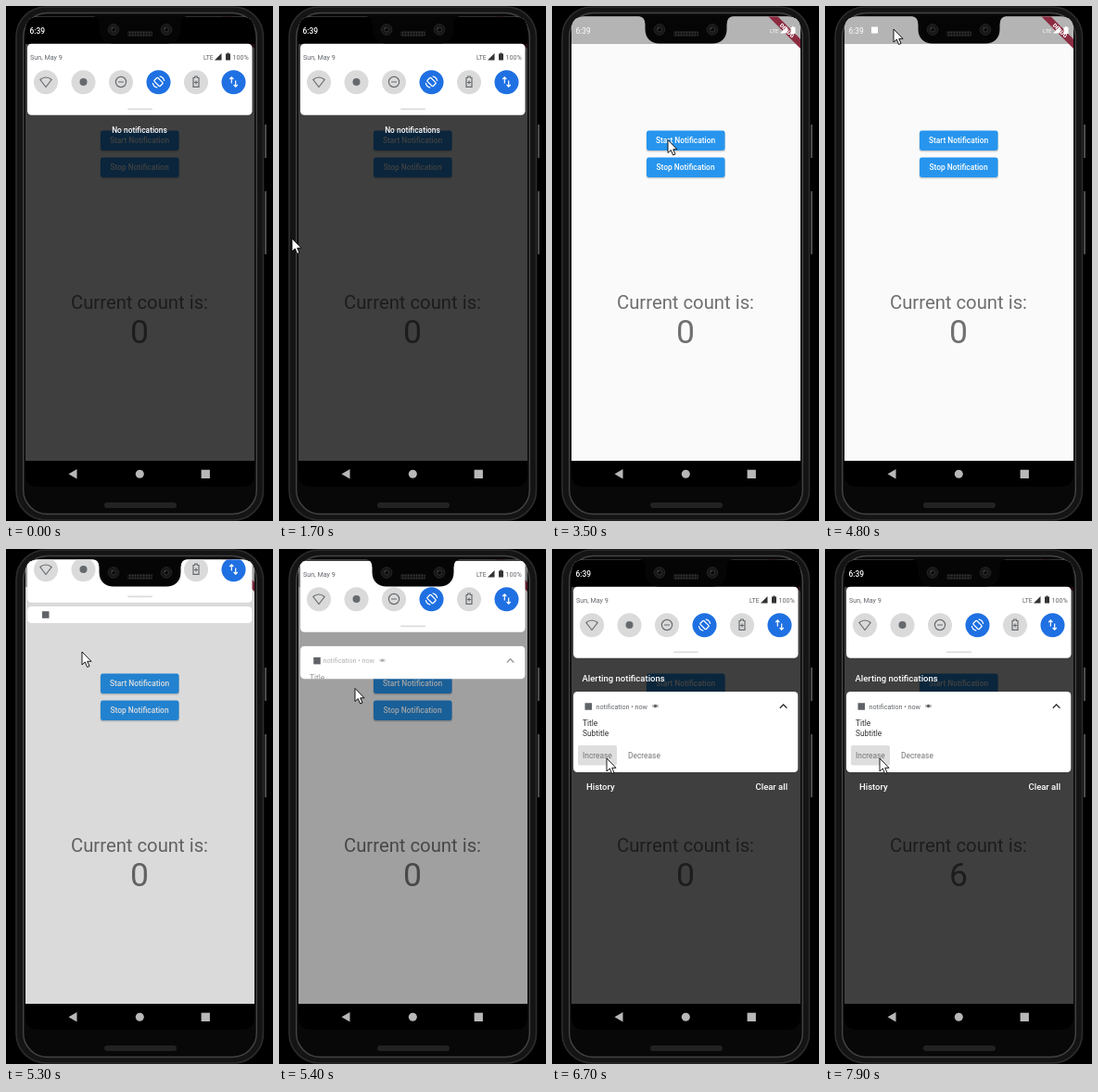
An HTML page that plays this animation: 288x556 px, repeating every 8 s.

```html
<!DOCTYPE html>
<html lang="en">
<head>
<meta charset="utf-8">
<title>Notification counter</title>
<style>
html, body { margin: 0; width: 100%; height: 100%; overflow: hidden; background: #000; }
svg { display: block; width: 100%; height: 100%; }
text { font-family: Roboto, "Noto Sans", sans-serif; white-space: pre; }
.medium { font-weight: 500; }
.mid { text-anchor: middle; }
.line { fill: none; stroke: #666a6e; stroke-width: 1.2; }
.on { fill: none; stroke: #fff; stroke-width: 1.2; }
</style>
</head>
<body>
<svg viewBox="0 0 288 556" xmlns="http://www.w3.org/2000/svg">
  <defs>
    <clipPath id="screenClip"><path d="M21 491V25.5Q21 11.5 35 11.5H254Q268 11.5 268 25.5V491Z"/></clipPath>
    <clipPath id="cardClip"><rect id="cardHole" x="23" y="0" width="242.5" height="87" rx="4.5"/></clipPath>
    <clipPath id="buttonClip"><rect x="102" y="134.5" width="84.5" height="21.5" rx="2.4"/></clipPath>
    <pattern id="mesh" width="3" height="3" patternUnits="userSpaceOnUse">
      <rect width="3" height="3" fill="#121212"/><circle cx="1.5" cy="1.5" r=".9" fill="#363636"/>
    </pattern>
    <g id="signal"><path d="M0 7.5L7.5 0V7.5Z"/></g>
    <g id="battery"><path d="M0 1H1.5V0H3.5V1H5V8H0Z"/></g>
    <g id="lens">
      <circle r="5.8" fill="#161616" stroke="#262626"/>
      <circle r="2.6" fill="#0a0a0a" stroke="#3a3a3a" stroke-width=".8"/>
      <circle cx="-1.4" cy="-1.4" r=".7" fill="#666"/>
    </g>
  </defs>

  <!-- phone body -->
  <rect width="288" height="556"/>
  <path d="M280 128V164M280 200V268" stroke="#4c4c4c" stroke-width="2"/>
  <rect x="11" y="1" width="266.5" height="554" rx="32" fill="#141414" stroke="#2c2c2c" stroke-width="1.6"/>
  <rect x="18.7" y="7.5" width="251.6" height="541" rx="26" fill="#080808" stroke="#444" stroke-width="1.4"/>
  <path d="M21 480H268V505Q268 519 254 519H35Q21 519 21 505Z"/>
  <rect x="106" y="536" width="78" height="6" rx="3" fill="#222"/>

  <g clip-path="url(#screenClip)">
    <!-- app -->
    <rect x="21" y="11" width="247" height="480" fill="#fafafa"/>
    <rect x="21" y="11" width="247" height="30" fill="#b4b4b4"/>
    <g fill="#000" opacity=".16">
      <rect x="101.5" y="135.5" width="85.5" height="22" rx="3"/>
      <rect x="101.5" y="164.5" width="85.5" height="22" rx="3"/>
    </g>
    <g fill="#2795ee">
      <rect x="102" y="134.5" width="84.5" height="21.5" rx="2.4"/>
      <rect x="102" y="163.5" width="84.5" height="21.5" rx="2.4"/>
    </g>
    <circle id="ripple" cx="125" cy="146" fill="#fff" clip-path="url(#buttonClip)"/>
    <g class="medium mid" font-size="8.4" fill="#fff">
      <text x="144" y="148.3">Start Notification</text>
      <text x="144" y="177.3">Stop Notification</text>
    </g>
    <g class="mid" fill="#707070">
      <text x="144" y="327.3" font-size="20.3">Current count is:</text>
      <text id="count" x="144" y="363.5" font-size="35.5">0</text>
    </g>
    <g transform="translate(268 12) rotate(45)">
      <rect x="-30" y="16.8" width="60" height="7.2" fill="#8b2b40"/>
      <text class="mid" y="22.6" font-size="6" font-weight="900" fill="#fff">DEBUG</text>
    </g>
    <g fill="#fff">
      <text x="25.5" y="29.5" font-size="8.4">6:39</text>
      <text x="235" y="29" font-size="6">LTE</text>
      <use href="#signal" x="246" y="22"/>
      <use href="#battery" x="257.5" y="22"/>
      <rect id="statusIcon" x="50" y="22.5" width="7" height="7"/>
    </g>

    <rect id="scrim" x="21" y="11" width="247" height="480"/>

    <!-- quick settings -->
    <g id="panel">
      <rect x="21" y="-20" width="247" height="61"/>
      <text class="medium" x="25.5" y="29.5" font-size="8.4" fill="#fff">6:39</text>
      <rect x="23" y="40.7" width="242.5" height="77" rx="4.5" fill="#fff"/>
      <g font-size="7.2" fill="#5f6368">
        <text x="26" y="57.8">Sun, May 9</text>
        <text x="213" y="57.8" font-size="6.7">LTE</text>
        <use href="#signal" x="225" y="51" fill="#333"/>
        <use href="#battery" x="237" y="50.5" fill="#333"/>
        <text x="244.5" y="57.8">100%</text>
      </g>
      <g id="tiles"></g>
      <path class="line" d="M36.8 79.5Q43 74.5 49.2 79.5L43 87.5Z" stroke-linejoin="round"/>
      <circle cx="83.5" cy="82" r="4" fill="#666a6e"/>
      <circle class="line" cx="124" cy="82" r="5.6"/><path class="line" d="M121 82H127"/>
      <g transform="translate(164.5 82)">
        <rect class="on" x="-2.7" y="-4.4" width="5.4" height="8.8" rx=".8" transform="rotate(-45)"/>
        <path class="on" d="M1.2 -6.2A6.3 6.3 0 0 1 6.2 -1.2M-1.2 6.2A6.3 6.3 0 0 1 -6.2 1.2"/>
      </g>
      <path class="line" d="M202 77.5H203.7V76H206.3V77.5H208V87.4H202ZM205 80.4V84.6M202.9 82.5H207.1"/>
      <path class="on" d="M243.3 83.5V77M241.2 79L243.3 76.8L245.4 79M247.7 80.5V87M245.6 85L247.7 87.2L249.8 85"/>
      <rect x="131" y="110.4" width="27" height="1.8" rx=".9" fill="#dcdcdc"/>
      <text id="empty" class="medium mid" x="144" y="136.6" font-size="8.4" fill="#fff">No notifications</text>
      <text id="alerting" class="medium" x="32.5" y="143.2" font-size="9.5" fill="#fff">Alerting notifications</text>
    </g>

    <!-- notification -->
    <g id="card">
      <g clip-path="url(#cardClip)">
        <rect x="23" width="242.5" height="87" fill="#fff"/>
        <rect id="press" x="28" y="58" width="42" height="21.5" rx="2" fill="#dedede"/>
        <rect id="appIcon" width="7.5" height="7.5" fill="#5f6368"/>
        <g id="cardText">
          <g fill="#5f6368">
            <text x="47.5" y="18.5" font-size="7.2">notification • now</text>
            <circle cx="111.5" cy="15.6" r="1.8"/>
            <path d="M109 14V17.2M114 14V17.2" stroke="#5f6368" stroke-width=".7"/>
          </g>
          <path d="M245.8 17.8L249.6 14L253.4 17.8" fill="none" stroke="#333" stroke-width="1.3"/>
          <g font-size="8.4">
            <text x="33" y="37" fill="#333">Title</text>
            <text x="33" y="48" fill="#333">Subtitle</text>
            <g id="actions" fill="#757575">
              <text x="33" y="72.3">Increase</text>
              <text x="82" y="72.3">Decrease</text>
            </g>
          </g>
        </g>
      </g>
    </g>
    <g id="footer" class="medium" font-size="9.5" fill="#fff">
      <text x="37" y="259.6">History</text>
      <text x="219.5" y="259.6">Clear all</text>
    </g>
  </g>

  <!-- notch and navigation -->
  <path d="M94 11Q100.5 12 100.5 20V25C100.5 35 107 40.5 116 40.5H173C182 40.5 188.5 35 188.5 25V20Q188.5 12 195 11Z" fill="#050505"/>
  <use href="#lens" x="116" y="25.5"/>
  <use href="#lens" x="173" y="25.5"/>
  <rect x="131" y="27" width="27" height="6" rx="2" fill="url(#mesh)"/>
  <g fill="#b8b8b8">
    <path d="M67.5 505.3L76.5 500V510.6Z"/>
    <circle cx="144.3" cy="505.3" r="4.5"/>
    <rect x="210.6" y="500.7" width="9.3" height="9.3"/>
  </g>

  <path id="cursor" d="M0 0V14L3.3 11L5.6 16.5L8 15.5L5.7 10.3H10Z" fill="#fff" stroke="#000" stroke-width=".9"/>
</svg>
<script>
const LOOP = 8000, STEP = 100;
const el = id => document.getElementById(id);
const set = (id, attrs) => {
  for (const name in attrs) el(id).setAttribute(name, attrs[name]);
};

// Linear interpolation through [time, value] points.
function track(t, points) {
  if (t <= points[0][0]) return points[0][1];
  for (let i = 1; i < points.length; i++) {
    const [t0, a] = points[i - 1], [t1, b] = points[i];
    if (t < t1) return a + (b - a) * (t - t0) / (t1 - t0);
  }
  return points[points.length - 1][1];
}

const SHIFT = [[2200, 0], [2300, -10], [2400, -49], [2500, -88], [2600, -110], [2700, -118],
  [4900, -118], [5000, -113], [5100, -100], [5300, -60], [5400, -28], [5500, -7], [5600, 0]];
const SCRIM = [[2200, .75], [2300, .73], [2400, .67], [2600, .3], [2900, 0],
  [5000, 0], [5200, .06], [5300, .13], [5400, .36], [5500, .62], [5600, .745]];
const CURSOR_X = [[1700, 14], [1900, 52], [2100, 81], [2600, 81], [3100, 113], [3500, 125],
  [3900, 125], [4600, 72], [4800, 74], [4900, 74], [5300, 82], [5900, 82], [6300, 59]];
const CURSOR_Y = [[1700, 251], [2100, 240], [2600, 240], [3100, 168], [3500, 144.5],
  [3900, 144.5], [4600, 35], [4800, 25], [4900, 25], [5100, 55], [5300, 111], [5500, 190],
  [5600, 218], [5900, 218], [6300, 226]];
const TAPS = [6900, 7100, 7300, 7400, 7600, 7800];

for (let i = 0; i < 6; i++) {
  const fill = i === 3 || i === 5 ? '#1f70e2' : '#dadada';
  el('tiles').innerHTML += `<circle cx="${43 + 40.5 * i}" cy="82.2" r="13" fill="${fill}"/>`;
}

function draw(t) {
  const shift = track(t, SHIFT);
  set('panel', { transform: `translate(0 ${shift})` });
  set('scrim', { opacity: track(t, SCRIM) });
  set('empty', { opacity: track(t, [[2200, 1], [2400, 0]]) });
  set('alerting', { opacity: track(t, [[5300, 0], [5600, 1]]) });

  const height = track(t, [[5000, 0], [5100, 4], [5300, 18], [5600, 71], [5800, 87]]);
  const gap = track(t, [[5300, 4], [5600, 36]]);
  set('card', {
    transform: `translate(0 ${118 + shift + gap})`,
    visibility: t > 5000 ? 'visible' : 'hidden'
  });
  set('cardHole', { height });
  set('appIcon', {
    x: track(t, [[5300, 39], [5500, 35.5]]),
    y: Math.min(height / 2, 16) - 3.75
  });
  set('cardText', { opacity: track(t, [[5300, 0], [5500, 1]]) });
  set('actions', { opacity: track(t, [[5500, .4], [5600, .7], [5800, 1]]) });
  set('footer', { opacity: track(t, [[5800, 0], [6100, 1]]) });

  el('count').textContent = TAPS.filter(tap => t >= tap).length;
  set('press', { opacity: t < 6700 ? 0 : TAPS.includes(t) ? .8 : 1 });

  set('ripple', {
    r: track(t, [[3700, 0], [4100, 66]]),
    opacity: track(t, [[3700, .24], [4000, .2], [4300, 0]])
  });
  set('statusIcon', { opacity: t >= 4100 ? 1 : 0 });
  set('cursor', {
    transform: `translate(${track(t, CURSOR_X)} ${track(t, CURSOR_Y)})`,
    visibility: t >= 1700 ? 'visible' : 'hidden'
  });
}

const start = performance.now();
function tick() {
  const t = (performance.now() - start) % LOOP;
  draw(Math.floor(t / STEP) * STEP);
  requestAnimationFrame(tick);
}
tick();
</script>
</body>
</html>
```
